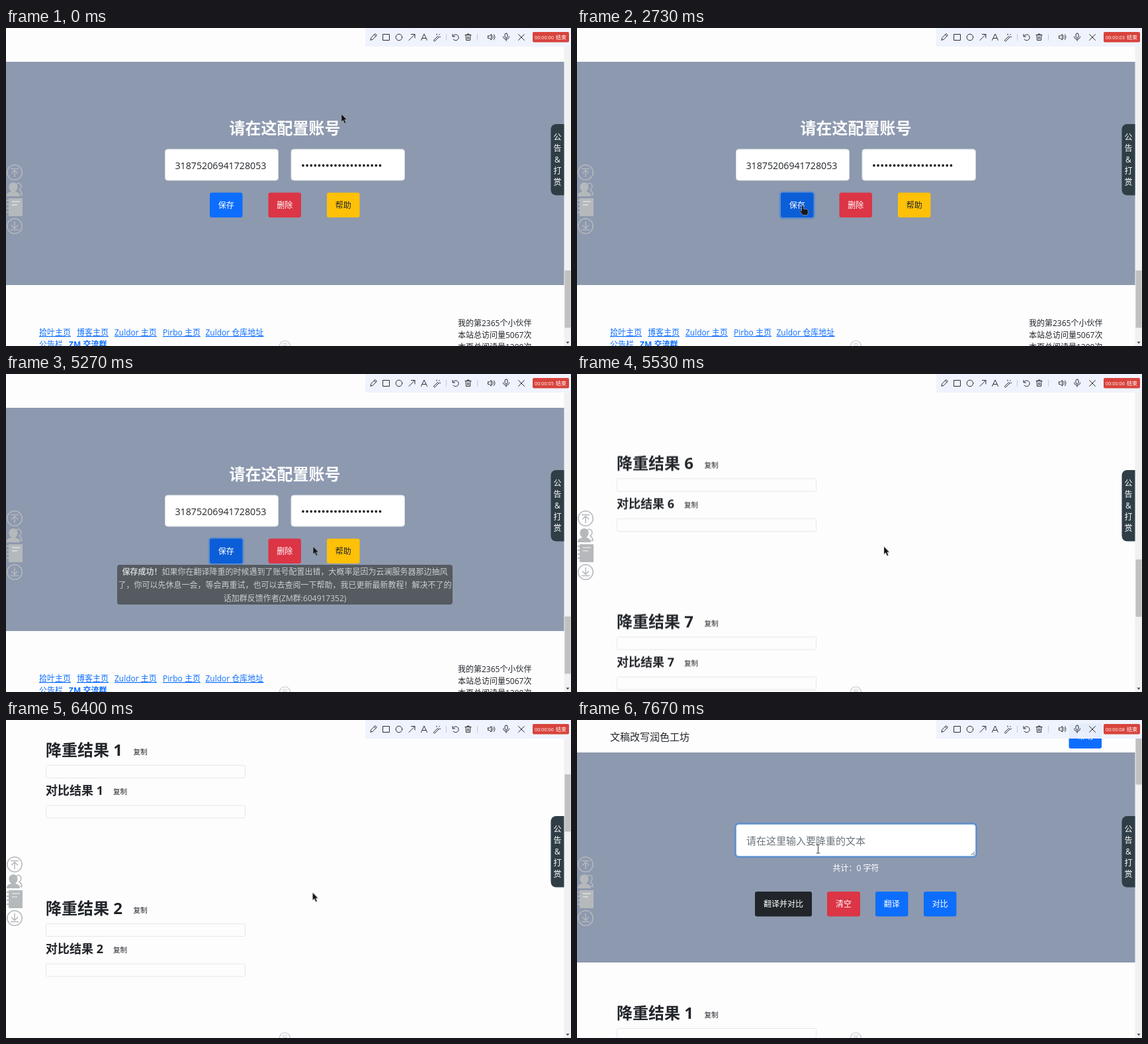
Write an HTML page that moves like this. It is 854x480 px and loops after 8 s.

```html
<!DOCTYPE html>
<html lang="zh-CN">
<head>
<meta charset="utf-8">
<title>文稿工具演示</title>
<style>
html, body { margin: 0; width: 100%; height: 100%; overflow: hidden; background: #fdfdfe; }
#stage { display: block; width: 100vw; height: 100vh; }
text { font: 12px "Open Sans", "Noto Sans CJK SC", "Noto Sans", sans-serif; fill: #212529; white-space: pre; }
.mid { text-anchor: middle; }
.light { fill: #fff; }
.b { font-weight: 700; }
.h1 { font-size: 24px; font-weight: 700; }
.h2 { font-size: 18px; font-weight: 700; }
.field { font-size: 15px; }
.copy { font-size: 10.6px; }
.link { fill: #0d6efd; text-decoration: underline; }
.hero { fill: #8d99af; }
.box { fill: none; stroke: #e4e7ea; }
.input { fill: #fff; stroke: #d8dde2; }
.note text { fill: #cacfd0; }
.icon { fill: none; stroke: #2b2c30; stroke-width: 1; stroke-linecap: round; stroke-linejoin: round; }
.side { fill: none; stroke: #b5b9bb; stroke-width: 1.5; }
.ring { fill: none; stroke: #2f7fe6; stroke-opacity: .45; stroke-width: 3; }

#page, #thumb, #cursor, #arrow, #hand, #beam, #save, #saveRing, #del, #note, #areaRing, #ticks {
  animation: 8s linear infinite;
}
#page { animation-name: scroll; }
#thumb { animation-name: thumb; }
#cursor { animation-name: move; }
#arrow, #hand, #beam, #save, #del, #note, #areaRing, #ticks { animation-timing-function: step-end; }
#arrow { animation-name: arrow; }
#hand { animation-name: hand; }
#beam { animation-name: beam; }
#save { animation-name: save; }
#saveRing { animation-name: saveRing; }
#del { animation-name: del; }
#note { animation-name: note; }
#areaRing { animation-name: areaRing; }
#ticks { animation-name: ticks; }

@keyframes scroll {
  0% { transform: translateY(-1983px); }
  65.875% { transform: translateY(-1983px); animation-timing-function: steps(4); }
  69.125% { transform: translateY(-1502.5px); animation-timing-function: steps(13); }
  80% { transform: translateY(-397px); animation-timing-function: steps(4); }
  83.375% { transform: translateY(-34px); animation-timing-function: steps(1); }
  84.125%, 100% { transform: translateY(0); }
}
@keyframes thumb {
  0% { transform: translateY(355px); }
  65.875% { transform: translateY(355px); animation-timing-function: steps(4); }
  69.125% { transform: translateY(269px); animation-timing-function: steps(13); }
  80% { transform: translateY(71px); animation-timing-function: steps(4); }
  83.375% { transform: translateY(6px); animation-timing-function: steps(1); }
  84.125%, 100% { transform: translateY(0); }
}
@keyframes move {
  0% { transform: translate(507px, 130px); }
  .875% { transform: translate(507px, 130px); animation-timing-function: steps(6); }
  5.875% { transform: translate(482px, 151px); animation-timing-function: steps(10); }
  14.625% { transform: translate(385px, 232px); animation-timing-function: steps(8); }
  20.875% { transform: translate(341px, 268px); }
  45% { transform: translate(341px, 268px); animation-timing-function: steps(12); }
  55% { transform: translate(466px, 261px); animation-timing-function: step-end; }
  57.5% { transform: translate(464.5px, 260.5px); }
  80% { transform: translate(463.5px, 260.5px); animation-timing-function: steps(4); }
  83.375% { transform: translate(445px, 256.5px); animation-timing-function: steps(11); }
  92.5%, 100% { transform: translate(364.5px, 194.5px); }
}
@keyframes arrow {
  0%, 46.5%, 53.5% { opacity: 1; }
  17.5%, 49.5%, 90.875%, 100% { opacity: 0; }
}
@keyframes hand {
  0%, 46.5%, 53.5%, 100% { opacity: 0; }
  17.5%, 49.5% { opacity: 1; }
}
@keyframes beam {
  0% { opacity: 0; }
  90.875%, 100% { opacity: 1; }
}
@keyframes save {
  0% { fill: #0d6efd; }
  17.5%, 100% { fill: #0b5ed7; }
}
@keyframes saveRing {
  0%, 24.125% { opacity: 0; }
  26.625%, 100% { opacity: 1; }
}
@keyframes del {
  0%, 53.5%, 100% { fill: #dc3545; }
  49.5% { fill: #bb2d3b; }
}
@keyframes note {
  0% { opacity: 0; }
  38.375%, 100% { opacity: 1; }
}
@keyframes areaRing {
  0% { opacity: 0; }
  94.125%, 100% { opacity: 1; }
}
@keyframes ticks {
  0% { transform: translateY(0); }
  7.5% { transform: translateY(-20px); }
  20% { transform: translateY(-40px); }
  33.75% { transform: translateY(-60px); }
  45% { transform: translateY(-80px); }
  55% { transform: translateY(-100px); }
  68.75% { transform: translateY(-120px); }
  81.25% { transform: translateY(-140px); }
  94.125%, 100% { transform: translateY(-160px); }
}
</style>
</head>
<body>
<svg id="stage" viewBox="0 0 854 480">
  <rect width="854" height="480" fill="#fdfdfe"/>

  <g id="page">
    <text class="field" x="50" y="30.5">文稿改写润色工坊</text>
    <g id="top">
      <rect class="hero" y="49" width="844" height="317"/>
      <rect class="input" x="240.5" y="157.5" width="362" height="48" rx="4"/>
      <rect class="ring" id="areaRing" x="239.5" y="156.5" width="364" height="50" rx="5"/>
      <text class="field" x="256" y="187.5" style="fill:#6c757d">请在这里输入要降重的文本</text>
      <path d="M596 204l5-5M599 204l2-2" stroke="#55585c"/>
      <text class="mid light" x="421.5" y="228">共计：0 字符</text>
    </g>
    <g id="results"></g>
    <g id="account" transform="translate(0 1983)">
      <rect class="hero" y="51" width="844" height="337"/>
      <text class="h1 mid light" x="421.5" y="160">请在这配置账号</text>
      <rect class="input" x="240.5" y="183" width="171" height="47" rx="4"/>
      <rect class="input" x="431" y="183" width="171.5" height="47" rx="4"/>
      <text x="255.5" y="212.5" style="font-size:14.2px">31875206941728053</text>
      <path d="M449 207.5H566.500" stroke="#212529" stroke-width="3.8" stroke-linecap="round" stroke-dasharray="0 6.13"/>
    </g>
    <g transform="translate(0 1983)">
      <g class="note" id="note">
        <rect x="168" y="288" width="507" height="60" rx="4" fill="#555b61"/>
        <text class="mid" x="421.5" y="303"><tspan class="b">保存成功！</tspan>如果你在翻译降重的时候遇到了账号配置出错，大概率是因为云澜服务器那边抽风</text>
        <text class="mid" x="421.5" y="323">了，你可以先休息一会，等会再重试，也可以去查阅一下帮助，我已更新最新教程！解决不了的</text>
        <text class="mid" x="421.5" y="343">话加群反馈作者(ZM群:604917352)</text>
      </g>
      <text class="link" x="50" y="464">拾叶主页</text>
      <text class="link" x="107" y="464">博客主页</text>
      <text class="link" x="164" y="464">Zuldor 主页</text>
      <text class="link" x="237" y="464">Pirbo 主页</text>
      <text class="link" x="301.5" y="464">Zuldor 仓库地址</text>
      <text class="link" x="50" y="482">公告栏</text>
      <text class="link b" x="95" y="482">ZM 交流群</text>
      <text x="683" y="450">我的第2365个小伙伴</text>
      <text x="683" y="468">本站总访问量5067次</text>
      <text x="683" y="485.5">本页总阅读量1290次</text>
    </g>
  </g>

  <!-- scrollbar -->
  <rect x="843.5" width="10.5" height="480" fill="#f1f1f2"/>
  <rect id="thumb" x="844.5" y="11" width="9" height="86.5" fill="#c1c1c1"/>
  <path d="M846.5 473.5h5l-2.5 3z" fill="#404044"/>

  <!-- side shortcuts -->
  <g class="side">
    <circle cx="13" cy="218" r="11.2"/>
    <path d="M7 212.5h12M13 225v-10M8 219.5l5-5 5 5"/>
    <circle cx="13" cy="299" r="11.2"/>
    <path d="M7 304.5h12M13 292v10M8 297.5l5 5 5-5"/>
    <path d="M16 235c7-3 9 5 4 9.5 2 2 4 2 4 7h-3"/>
  </g>
  <g fill="#b5b9bb">
    <path d="M1 254c0-5 3-6 7-7-6-5-4-14 3-14s9 9 3 14c4 1 7 2 7 7z"/>
    <path d="M4 257h21v27H4z"/>
    <path d="M1 260h6M1 266h6M1 272h6M1 278h6" stroke="#b5b9bb" stroke-width="2"/>
  </g>
  <path d="M9 262h12M9 267h8" stroke="#dfe2e4" stroke-width="1.5"/>

  <g id="tab">
    <path d="M843.5 145v107.5h-12a8 8 0 0 1-8-8v-91.5a8 8 0 0 1 8-8z" fill="#2f3e46"/>
  </g>

  <g fill="none" stroke="#c4c6c8" stroke-width="1.2">
    <circle cx="421.5" cy="480" r="8"/>
    <path d="M418 477.5q3.5-3 7 0M418 480.5q3.5-3 7 0"/>
  </g>

  <!-- recorder bar -->
  <rect x="543" width="311" height="28" fill="#eff3fd" fill-opacity=".96"/>
  <g class="icon">
    <path d="M551 18l1-3.5 6-6 2.500 2.500-6 6zM556.5 10l2.5 2.5"/>
    <rect x="570" y="9.5" width="9.5" height="9"/>
    <circle cx="594" cy="14" r="4.8"/>
    <path d="M609 18.5l8.5-8.500M612.5 9.5h5.500v5.500"/>
    <path d="M627.5 18.5l4.5-9.5 4.5 9.5M629.5 15.5h5"/>
    <path d="M646.5 18.5l6-6 1.5 1.5-6 6zM651 9v1.5M655.5 9.5l-1 1M656.5 13.5h-1.5"/>
    <path d="M675 9.5v3.5h3.5M675.5 12.5a4.5 4.5 0 1 1 .5 4.5"/>
    <path d="M694 10.5h9M697 10.5v-1.5h3v1.5M695 10.5l.5 8h6l.5-8M697.5 13v3.500M699.5 13v3.500"/>
    <path d="M728.5 12v3.5h2l3 2.5v-8.500l-3 2.500zM735.5 11.5q2 2.2 0 4.5M737.5 10q3 3.7 0 7.500"/>
    <rect x="754" y="8" width="4" height="7" rx="2"/>
    <path d="M751.5 13c0 5.5 9 5.5 9 0M756 17v2.5"/>
    <path d="M774.5 9.5l9 9M783.5 9.5l-9 9"/>
  </g>
  <path d="M665.5 9v10M712.5 9v10" stroke="#c6c9d2"/>
  <rect x="796" y="6" width="55" height="15.5" rx="2" fill="#d8433c"/>
  <svg x="796" y="6" width="35" height="15"><g id="ticks"></g></svg>
  <text class="light" x="831" y="16.7" style="font-size:8px">结束</text>

  <!-- pointer -->
  <g id="cursor">
    <path id="arrow" d="M0 0v11.5l2.6-2.3 2.2 4.8 2-.9-2.2-4.7h3.6z" fill="#101114" stroke="#d4d6da" stroke-width=".4"/>
    <path id="hand" d="M-1.5.5q1.5-1.5 2.8 0v4.5q5.5 0 7 2v4l-1.5 3.500h-6.500l-4.500-6q0-2 2.700-.5z" fill="#16181c" stroke="#c4c8cc" stroke-width=".5"/>
    <path id="beam" d="M-2.5-6.5h2l.5.5.5-.5h2M0-6v12M-2.5 6.5h2l.5-.5.5.5h2" fill="none" stroke="#16181c"/>
  </g>
</svg>
<script>
const $ = id => document.getElementById(id);
const add = (id, markup) => $(id).insertAdjacentHTML("beforeend", markup);
const blue = "#0d6efd", red = "#dc3545", yellow = "#ffc107", dark = "#212529", white = "#fff";

const button = (x, y, w, label, fill, ink = white, id = "") =>
  `<rect ${id && `id="${id}"`} x="${x}" y="${y}" width="${w}" height="37.5" rx="3" fill="${fill}"/>
   <text class="mid" x="${x + w / 2}" y="${y + 23.2}" style="fill:${ink}">${label}</text>`;

add("top",
  button(743.5, 5.5, 49.5, "帮助", blue) +
  button(269, 259, 86, "翻译并对比", dark) +
  button(378, 259, 50, "清空", red) +
  button(451, 259, 49.5, "翻译", blue) +
  button(524, 259, 49.5, "对比", blue));

add("account",
  `<rect class="ring" id="saveRing" x="307" y="248" width="51.5" height="39" rx="4"/>` +
  button(308, 248.5, 49.5, "保存", blue, white, "save") +
  button(396.5, 248.5, 49.5, "删除", red, white, "del") +
  button(485, 248.5, 49.5, "帮助", yellow, dark));

for (let i = 0; i < 7; i++) {
  add("results", `<g transform="translate(60 ${442 + 239 * i})">
    <text class="h1" y="9">降重结果 ${i + 1}</text><text class="copy" x="132.5" y="6.5">复制</text>
    <rect class="box" x=".5" y="23.5" width="301" height="19" rx="2"/>
    <text class="h2" y="67.5">对比结果 ${i + 1}</text><text class="copy" x="102" y="67">复制</text>
    <rect class="box" x=".5" y="84" width="301" height="19" rx="2"/></g>`);
}

["公", "告", "&amp;", "打", "赏"].forEach((c, i) =>
  add("tab", `<text class="mid light" x="833.5" y="${169.2 + 17 * i}">${c}</text>`));

for (let s = 0; s < 9; s++) {
  add("ticks", `<text class="light" x="3" y="${10.6 + 20 * s}" style="font-size:7.3px">00:00:0${s}</text>`);
}
</script>
</body>
</html>
```
